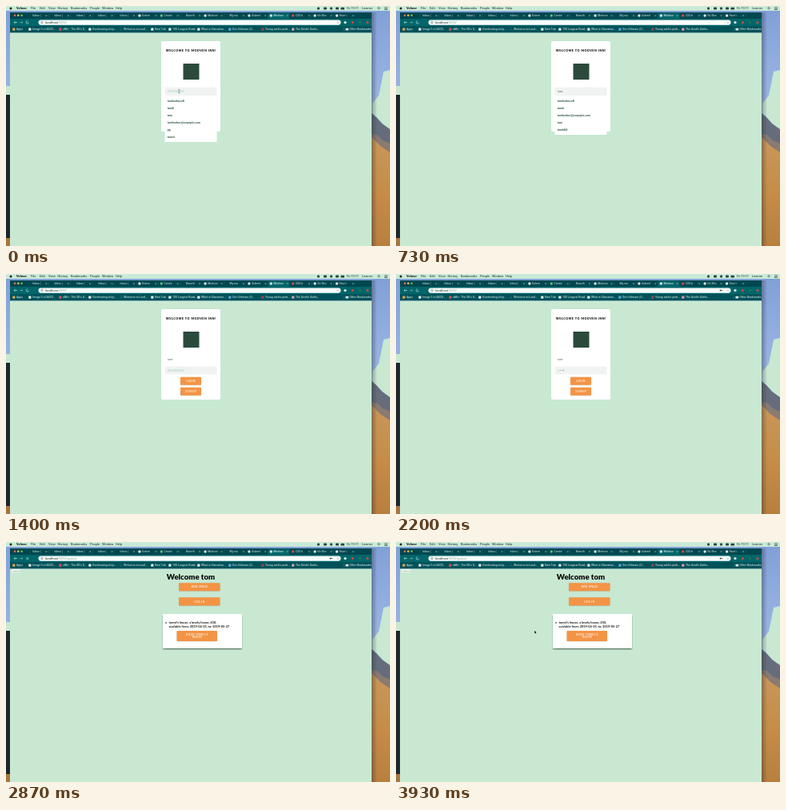
An HTML page with a canvas for the animation above (3990 ms loop, 480 px wide and 300 px high).

```html
<!DOCTYPE html>
<html lang="en">
<head>
<meta charset="utf-8">
<title>Room booking demo</title>
<style>
html, body { margin: 0; width: 100%; height: 100%; overflow: hidden; background: #c8e8d2; }
canvas { display: block; width: 480px; height: 300px; }
</style>
</head>
<body>
<canvas id="stage"></canvas>
<script>
const canvas = document.getElementById('stage');
const ctx = canvas.getContext('2d');
const dpr = window.devicePixelRatio || 1;
canvas.width = 480 * dpr;
canvas.height = 300 * dpr;

const LOOP = 3990;
const TICK = 1000 / 15;
const MINT = '#c8e8d2';
const STRIP = '#00474f';
const TOOLBAR = '#00666a';
const ORANGE = [243, 148, 69];
const SANS = 'Lato, "Open Sans", sans-serif';
const UI = 'Roboto, "Liberation Sans", sans-serif';

const clamp = v => Math.max(0, Math.min(1, v));
const mix = (a, b, k) => `rgb(${a.map((v, i) => Math.round(v + (b[i] - v) * k)).join(',')})`;

function rect(x, y, w, h, color) {
  ctx.fillStyle = color;
  ctx.fillRect(x, y, w, h);
}

function round(x, y, w, h, r, color) {
  ctx.fillStyle = color;
  ctx.beginPath();
  ctx.roundRect(x, y, w, h, r);
  ctx.fill();
}

function dot(x, y, r, color) {
  ctx.fillStyle = color;
  ctx.beginPath();
  ctx.arc(x, y, r, 0, Math.PI * 2);
  ctx.fill();
}

function ring(x, y, r, color, from = 0, to = 7) {
  ctx.strokeStyle = color;
  ctx.lineWidth = 0.6;
  ctx.beginPath();
  ctx.arc(x, y, r, from, to);
  ctx.stroke();
}

function poly(points, color) {
  ctx.fillStyle = color;
  ctx.beginPath();
  points.forEach(([x, y]) => ctx.lineTo(x, y));
  ctx.closePath();
  ctx.fill();
}

function line(points, color, width = 0.6) {
  ctx.strokeStyle = color;
  ctx.lineWidth = width;
  ctx.beginPath();
  points.forEach(([x, y]) => ctx.lineTo(x, y));
  ctx.stroke();
}

function text(str, x, y, size, color, { weight = 400, gap = 0, align = 'left', font = SANS } = {}) {
  ctx.font = `${weight} ${size}px ${font}`;
  ctx.letterSpacing = gap + 'px';
  ctx.textAlign = align;
  ctx.textBaseline = 'middle';
  ctx.fillStyle = color;
  ctx.fillText(str, x, y);
}

function shadowed(color, blur, dy, draw) {
  ctx.save();
  ctx.shadowColor = color;
  ctx.shadowBlur = blur * dpr;
  ctx.shadowOffsetY = dy * dpr;
  draw();
  ctx.restore();
}

function gradient(x0, y0, x1, y1, ...colors) {
  const g = ctx.createLinearGradient(x0, y0, x1, y1);
  colors.forEach((c, i) => g.addColorStop(i / (colors.length - 1), c));
  return g;
}

function desktop() {
  rect(0, 0, 480, 300, gradient(0, 0, 0, 150, '#7f9fd6', '#92aee0', '#a0bbe0'));
  poly([[472, 82], [480, 80], [480, 156], [470, 146], [458, 134], [458, 122], [466, 112]], MINT);
  poly([[457, 134], [463, 139], [470, 147], [480, 154], [480, 190], [457, 190]], '#656d7c');
  poly([[457, 160], [464, 161], [471, 168], [480, 172], [480, 190], [457, 190]], '#8a7a70');
  poly([[457, 164], [468, 175], [480, 183], [480, 300], [457, 300]],
    gradient(0, 165, 0, 300, '#c8975a', '#c58d48', '#b87f3e'));
  rect(457, 8, 7, 292, gradient(457, 0, 464, 0, 'rgba(30,30,40,.35)', 'rgba(30,30,40,0)'));
  rect(0, 100, 5, 11, MINT);
  rect(0, 111, 5, 179, '#1f272e');
  rect(0, 290, 5, 10, '#a87540');
}

const MENU = [['File', 31], ['Edit', 42], ['View', 53], ['History', 64.5], ['Bookmarks', 81],
  ['People', 105], ['Window', 120], ['Help', 137]];

function menuBar() {
  rect(0, 0, 480, 6, '#caead8');
  dot(6, 3, 1.5, '#222');
  const opt = { font: UI };
  text('Velmor', 13, 3.2, 4, '#111', { font: UI, weight: 700 });
  MENU.forEach(([label, x]) => text(label, x, 3.2, 4, '#1b2a28', opt));
  [389, 397, 405, 412].forEach((x, i) => round(x, 1.5, i % 2 ? 4 : 3, 3, 1, '#31423f'));
  round(418.5, 1.8, 4.5, 2.6, 0.5, '#31423f');
  text('Fri 19:11', 426, 3.2, 3.9, '#1b2a28', opt);
  text('Learner', 445, 3.2, 3.9, '#1b2a28', opt);
  ring(466, 2.7, 1.2, '#31423f');
  for (let i = 0; i < 3; i++) rect(473, 1.6 + i * 1.3, 4, 0.6, '#31423f');
}

const TABS = ['Inbox (', 'Inbox (', 'Inbox (', 'Inbox (', 'Inbox (', 'Extern', 'Create', 'Branch',
  'Modven', 'My rou', 'Submit', 'Modven', 'CSS b', 'Git Sho', 'How t'];
const TAB_ICONS = { 5: '#f0f0f0', 6: '#59c27b', 8: '#e8efed', 10: '#d8dedc', 11: '#e8efed', 12: '#d94b45', 13: '#e8efed', 14: '#e8efed' };
const MARKS = [['Apps', 13, '#e4a34d'], ['Image 5 of ASCII…', 33, '#e8efed'], ['oMiv - The UK\'s G…', 71, '#d8544c'],
  ['Overheating old p…', 108, '#dfe9e6'], ['Welcome to Lund…', 147, '#0d5f63'], ['New Tab', 186, '#dfe9e6'],
  ['100 Longest Road…', 208, '#dfe9e6'], ['What is Glaciation…', 244, '#dfe9e6'], ['Orin Velmare (O…', 283, '#55a7dd'],
  ['Young adults prob…', 324, '#8d4a55'], ['The Gentle Outlin…', 362, '#dd9cae']];

function tabStrip(t) {
  const pending = t >= 2730 && t < 2870;
  [['#ee6a5e', 11], ['#f5be4f', 15.3], ['#62c554', 19.6]].forEach(([c, x]) => dot(x, 11.8, 1.3, c));
  TABS.forEach((label, i) => {
    const x = 33 + i * 27.4;
    const active = i === 11;
    const busy = active && pending;
    if (active) round(x - 7, 8.8, 27, 7.4, [1.5, 1.5, 0, 0], TOOLBAR);
    else rect(x + 20.2, 10, 0.4, 4, '#2c6c70');
    if (busy) ring(x - 3, 12.1, 1.4, '#bfe3dd', t / 90, t / 90 + 4);
    else if (TAB_ICONS[i]) round(x - 4.6, 10.6, 3, 3, 0.8, TAB_ICONS[i]);
    text(busy ? 'localho' : label, x, 12.2, 3.5, active ? '#fff' : '#d2e4e3', { font: UI });
    line([[x + 16.4, 11.2], [x + 18.2, 13]], '#d2e4e3', 0.4);
    line([[x + 18.2, 11.2], [x + 16.4, 13]], '#d2e4e3', 0.4);
  });
}

function toolbar(t) {
  const loading = t >= 2670 && t < 2930;
  const ink = '#e6f2f0';
  line([[14, 20.5], [10, 20.5]], ink);
  line([[11.6, 19], [10, 20.5], [11.6, 22]], ink);
  line([[17, 20.5], [21, 20.5]], '#7fb3ae');
  line([[19.4, 19], [21, 20.5], [19.4, 22]], '#7fb3ae');
  if (loading) {
    line([[25.3, 19], [28.3, 22]], ink);
    line([[28.3, 19], [25.3, 22]], ink);
  } else {
    ring(26.8, 20.5, 1.6, ink, 0, 5);
  }

  round(40.5, 17.4, 378, 6.3, 3.1, '#fbfdfc');
  ring(45, 20.5, 1.3, '#5d6c69');
  text('localhost', 49, 20.6, 3.9, '#1c2a28', { font: UI });
  const host = ctx.measureText('localhost').width;
  const path = t < 2670 ? ':9292/' : t < 2870 ? ':9292/log-in' : ':9292/spaces';
  text(path, 49 + host, 20.6, 3.9, '#86a799', { font: UI });
  if (t >= 1800) {
    dot(405.6, 20.5, 1, '#3d4d4a');
    rect(406, 20.2, 2.4, 0.7, '#3d4d4a');
  }
  text('☆', 413, 20.6, 4, '#4d5c59', { font: '"DejaVu Sans", sans-serif' });
  ['#f0f5f4', '#d0463f', '#1f7a50', '#d0463f'].forEach((c, i) => dot(424 + i * 9.3, 20.5, 1.6, c));
}

function browser(t) {
  rect(5, 8, 452, 8, STRIP);
  rect(5, 16, 452, 9, TOOLBAR);
  rect(5, 25, 452, 8.5, '#00525a');
  tabStrip(t);
  toolbar(t);
  MARKS.forEach(([label, x, c]) => {
    round(x - 4.8, 27.5, 3.2, 3.2, 0.8, c);
    text(label, x, 29.2, 3.5, '#e6f2f0', { font: UI });
  });
  rect(422, 27, 0.4, 4.5, '#4c8d92');
  round(424.5, 27.8, 3.6, 2.7, 0.5, '#d9e6e4');
  text('Other Bookmarks', 429.5, 29.2, 3.5, '#e6f2f0', { font: UI });
  rect(5, 33.5, 452, 266.5, MINT);
}

function button(x, y, w, h, rows, glow = 0) {
  shadowed('rgba(60,90,75,.25)', 1.2, 0.5, () => round(x, y, w, h, 1, mix(ORANGE, [248, 166, 92], glow)));
  ctx.globalAlpha = 1 - glow * 0.4;
  rows.forEach((row, i) => {
    const dy = (i - (rows.length - 1) / 2) * 3.3;
    text(row, x + w / 2 + 0.3, y + h / 2 + dy + 0.2, 2.8, '#fff', { weight: 700, gap: 0.6, align: 'center' });
  });
  ctx.globalAlpha = 1;
}

function suggestions(items) {
  rect(198.5, 113, 65, items.length * 9 + 3, '#fff');
  items.forEach((s, i) => text(s, 201.7, 119.4 + i * 9, 3.6, '#24503a', { weight: 700 }));
}

function signIn(t) {
  round(194, 44, 74, 113, 2, '#fff');
  text('WELCOME TO MODVEN INN!', 231.3, 55.4, 3.7, '#0c0c0c', { weight: 900, gap: 0.52, align: 'center' });
  rect(221.5, 72, 20, 20, '#2c4a3c');

  // The focused field is grey; focus moves down as the list closes.
  const focus = t < 870 ? 0 : clamp((t - 800) / 270);
  round(198.5, 101.5, 65, 10.5, 1.5, mix([241, 243, 242], [255, 255, 255], focus));
  round(198.5, 115.5, 65, 10, 1.5, mix([255, 255, 255], [241, 243, 242], focus));
  const typed = 'tom'.slice(0, t < 130 ? 0 : t < 400 ? 1 : t < 600 ? 2 : 3);
  if (typed) text(typed, 202.3, 107, 3.5, '#465850');
  else text('USERNAME', 201.8, 107, 3.4, '#9accab', { gap: 0.35 });

  const dots = t < 1800 ? 0 : Math.min(4, 1 + Math.floor((t - 1800) / 200));
  if (!dots) text('PASSWORD', 201.8, 120.6, 3.4, '#9accab', { gap: 0.35 });
  for (let i = 0; i < dots; i++) dot(203.3 + i * 2.4, 120.5, 0.6, '#6aa48d');
  if (dots) rect(202.4 + dots * 2.4, 118.8, 0.4, 3.2, '#6aa48d');
  else if (t >= 1070 && t < 1400) rect(201.5, 118.5, 0.4, 3.6, '#333');

  button(218, 128.8, 26, 10, ['LOGIN']);
  button(218, 141.8, 26, 10, ['SIGNUP']);

  if (t < 130) suggestions(['tomharbour8', 'tomh', 'tom', 'tomharbor@example.com', 'pp', 'tomel']);
  else if (t < 400) suggestions(['tomharbour8', 'tomh', 'tom', 'tomharbor@example.com', 'tomel', 'tomh84']);
  else if (t < 600) suggestions(['tomharbour8', 'tomh', 'tomharbor@example.com', 'tom', 'tomh84', 'tomel']);
  else if (t < 870) suggestions(['tomharbour8', 'tomh', 'tomharbor@example.com', 'tom', 'tomh84']);

  if (t < 70) {
    line([[215.2, 104.4], [217.6, 104.4]], '#5b7367', 0.5);
    line([[216.4, 104.4], [216.4, 108.8]], '#5b7367', 0.5);
    line([[215.2, 108.8], [217.6, 108.8]], '#5b7367', 0.5);
  }
}

function pointer(x, y) {
  ctx.save();
  ctx.translate(x, y);
  ctx.beginPath();
  [[0, 0], [0, 3.4], [0.9, 2.7], [1.5, 4], [2.1, 3.7], [1.5, 2.5], [2.6, 2.4]].forEach(([a, b]) => ctx.lineTo(a, b));
  ctx.closePath();
  ctx.strokeStyle = '#fff';
  ctx.lineWidth = 0.5;
  ctx.stroke();
  ctx.fillStyle = '#111';
  ctx.fill();
  ctx.restore();
}

// One pointer position per tick, from 3270 ms on.
const TRAIL = [[232, 101], [222, 114], [209.3, 123.4], [207, 123.6], [206.2, 122.5], [206, 121], [205.7, 119],
  [205.5, 117], [193, 112.5], [181, 110], [173.2, 110.8]];

function spaces(t) {
  round(7, 34, 11, 4, 0.5, '#eef8f1');
  text('LOGOUT', 8.2, 36.1, 2.2, '#555', { gap: 0.1 });
  text('Welcome tom', 231, 43.6, 9.6, '#080808', { weight: 900, align: 'center' });
  button(216, 51.3, 51.5, 10, ['ADD SPACE']);
  button(216, 69.3, 51.5, 10.3, ['LOG IN']);

  shadowed('rgba(30,60,45,.65)', 1.4, 1.6, () => rect(196, 90, 99, 43, '#fff'));
  dot(200, 101, 0.8, '#111');
  text('tomel\'s house, a lovely house, £50,', 203.5, 101, 3.9, '#111', { weight: 700 });
  text('available from: 2019-04-25, to: 2019-05-27', 203.5, 106.2, 3.9, '#111', { weight: 700 });

  const glow = t < 3330 ? 0 : t < 3400 ? 1 : clamp(1 - (t - 3330) / 270);
  button(213.5, 111, 50.5, 13, ['BOOK TOMEL\'S', 'HOUSE'], glow);

  const spot = TRAIL[Math.floor((t + 4) / TICK) - 49];
  if (spot) pointer(...spot);
}

function draw(t) {
  ctx.setTransform(dpr, 0, 0, dpr, 0, 0);
  desktop();
  menuBar();
  browser(t);
  if (t < 2870) signIn(t);
  else spaces(t);
}

const start = performance.now();
function loop() {
  draw((performance.now() - start) % LOOP);
  requestAnimationFrame(loop);
}
loop();
</script>
</body>
</html>
```
